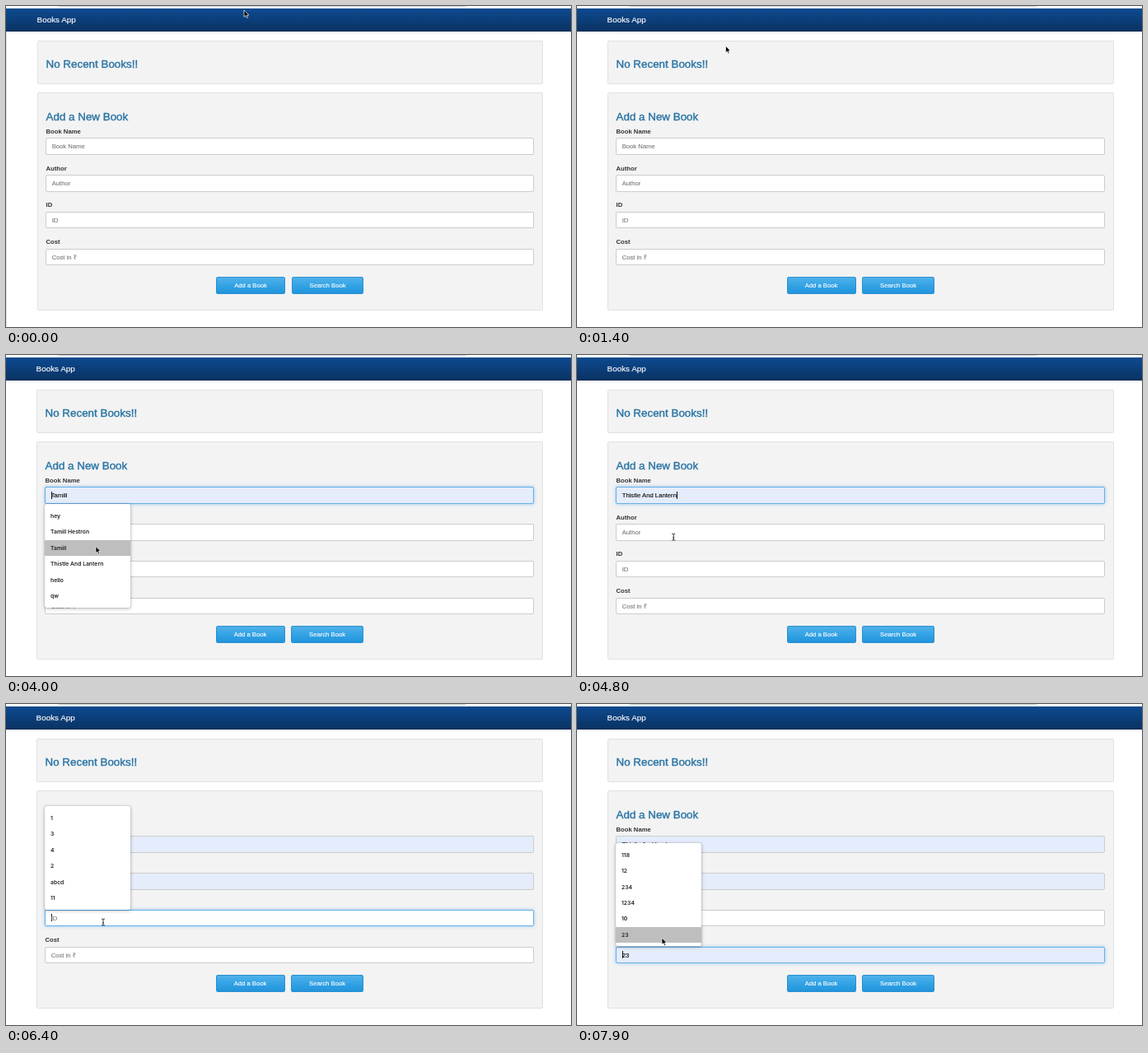
Write an HTML page that moves like this. It is 686 by 390 pixels and loops after 8 s.

```html
<!DOCTYPE html>
<html lang="en">
<head>
<meta charset="utf-8">
<title>Books App</title>
<style>
  html, body { margin: 0; width: 100%; height: 100%; overflow: hidden; background: #fff; }
  body { position: relative; font: 7.7px/10px "Liberation Sans", Arial, sans-serif; color: #333; }
  div, svg { position: absolute; box-sizing: border-box; white-space: pre; }
  #stage { --x: 37px; left: 0; top: 0; width: 686px; height: 390px; overflow: hidden; }
  #stage.early { --x: 38px; }
  #form { left: 0; top: 0; }
  .edge { left: 0; top: 30px; width: 1px; height: 360px; }
  .early .edge { background: #e2e2e2; }
  .tab { left: 64px; top: 0; width: 494px; height: 1px; background: #d0d8de; }
  .nav { left: 0; top: 2.5px; width: 686px; height: 28px; background: linear-gradient(#0d4a90, #0a3364);
         border-bottom: 1px solid #0a2a52; box-shadow: 0 1px 3px rgba(0,0,0,.12);
         padding-left: calc(var(--x) - .4px); font-size: 9.9px; line-height: 28px; color: #fff;
         -webkit-text-stroke: .15px #fff; }
  .panel { left: var(--x); width: calc(651.5px - var(--x)); background: #f3f3f3;
           border: 1px solid #e1e1e1; border-radius: 2px; }
  .head { left: calc(var(--x) + 10.5px); font-size: 13.4px; line-height: 16px; color: #2974a4;
          -webkit-text-stroke: .4px #2974a4; }
  .label { left: calc(var(--x) + 10.5px); font-weight: bold; }
  .field { left: calc(var(--x) + 10.2px); width: calc(630.5px - var(--x)); height: 20.7px;
           padding-left: 6.5px; line-height: 19px; background: #fff; border: 1px solid #ccc;
           border-radius: 2px; color: #777; -webkit-text-stroke: .1px; }
  .field.typed { color: #555; }
  .field.auto { background: #e5ecfb; color: #000; }
  .field.focus { border-color: #66afe9; box-shadow: 0 0 4px rgba(102,175,233,.65); }
  .field i { display: inline-block; width: 1px; height: 9px; margin-right: -1px;
             vertical-align: -1.5px; background: #111; }
  .button { top: 328.5px; height: 21px; line-height: 20px; text-align: center; color: #fff;
            background: linear-gradient(#4fb1ea, #2fa0e3 60%, #2294dc); border: 1px solid #2a90d0;
            border-radius: 2px; -webkit-text-stroke: .15px #fff; }
  #menu { left: 47.3px; width: 103.7px; padding: 5px 0 4px; background: #fff; border-radius: 2px;
          box-shadow: 0 0 1px rgba(0,0,0,.45), 0 1px 4px rgba(0,0,0,.3);
          font: 600 6.8px/19.43px Inter, sans-serif; color: #222; }
  #menu p { margin: 0; height: 19.43px; padding-left: 6.7px; }
  #menu p.on { background: #bebebe; }
  #arrow, #beam { left: 0; top: 0; overflow: visible; }
</style>
</head>
<body>
<div id="stage">
  <div class="edge"></div>
  <div class="tab"></div>
  <div class="nav">Books App</div>
  <div class="panel" style="top:41.5px;height:53px"></div>
  <div class="head" style="top:63.2px">No Recent Books!!</div>
  <div class="panel" style="top:105.3px;height:265px"></div>
  <div class="head" style="top:126.8px">Add a New Book</div>
  <div id="form"></div>
  <div class="button" style="left:calc(var(--x)/2 + 236px);width:84px">Add a Book</div>
  <div class="button" style="left:calc(var(--x)/2 + 327.8px);width:87.5px">Search Book</div>
  <div id="menu"></div>
  <svg id="arrow" width="8" height="12">
    <path d="M0 0V8.2L1.9 6.5L3.2 9.4L4.6 8.8L3.4 6H5.9Z" fill="#000" stroke="#fff" stroke-width=".7"/>
  </svg>
  <svg id="beam" width="6" height="10">
    <path d="M-2-4Q0-4 0-3Q0-4 2-4M0-3V3M-2 4Q0 4 0 3Q0 4 2 4M-1 .9H1" fill="none" stroke="#222" stroke-width=".9"/>
  </svg>
</div>
<script>
const LOOP = 8000, STEP = 100, ROW = 19.43, BLINK = 530;
const $ = id => document.getElementById(id);

// set: when the value stays; caret: when blinking restarts after typing
const fields = [
  { label: 'Book Name', hint: 'Book Name', value: 'Thistle And Lantern', focus: 2700, blur: 5000, set: 4300, auto: true },
  { label: 'Author', hint: 'Author', value: 'Dora Selven', focus: 5000, blur: 6300, set: 5700, auto: true },
  { label: 'ID', hint: 'ID', value: '1', focus: 6300, blur: 7400, set: 6500, caret: 6470 },
  { label: 'Cost', hint: 'Cost in ₹', focus: 7400, blur: LOOP, set: LOOP }
];

const menus = [
  { from: 2700, to: 4300, field: 0, top: 181, items: ['hey', 'Tamill Hestron', 'Tamill', 'Thistle And Lantern', 'hello', 'qw'] },
  { from: 5000, to: 5700, field: 1, top: 226, items: ['Dora Selven', 'adsda', 'Ivor Quenby', 'as', 'qwe', 'q'] },
  { from: 6300, to: 6500, field: 2, top: 124, items: ['1', '3', '4', '2', 'abcd', '11'] },
  { from: 6500, to: 7200, field: 2, top: 270.7, items: ['1', '11', '12'] },
  { from: 7400, to: LOOP, field: 3, top: 168.7, items: ['118', '12', '234', '1234', '10', '23'] }
];

// time, x, y of the pointer
const path = [
  [0, 289, 5], [100, 289, 5], [700, 180.5, 48.5], [1900, 180.5, 48.5], [2100, 257, 78],
  [2300, 257, 78], [2700, 122, 170], [3700, 122, 170], [4000, 109, 232.5], [4200, 113, 254],
  [4500, 113, 254], [4900, 118, 215], [5300, 118, 215], [5500, 122, 232.5], [5700, 122, 232.5],
  [6100, 118, 265], [6600, 118, 265], [7000, 184.7, 302], [7500, 184.7, 302],
  [7800, 103, 284], [LOOP, 103, 284]
];

fields.forEach((f, i) => {
  f.top = 160.4 + i * 44.7;
  const add = (cls, top) => {
    const el = document.createElement('div');
    el.className = cls;
    el.style.top = top + 'px';
    return $('form').appendChild(el);
  };
  add('label', f.top - 12.6).textContent = f.label;
  f.el = add('field', f.top);
});

function pointer(t) {
  const i = path.findIndex(p => p[0] > t);
  const [a, b] = [path[i - 1], path[i]];
  const u = (t - a[0]) / (b[0] - a[0]), e = u * u * (3 - 2 * u);
  return [a[1] + (b[1] - a[1]) * e, a[2] + (b[2] - a[2]) * e];
}

function drawField(f, t, preview) {
  const done = t >= f.set, focus = t >= f.focus && t < f.blur;
  const value = done ? f.value : preview;
  const start = done ? f.caret || f.set : f.focus;
  const caret = focus && (t - start) % (2 * BLINK) < BLINK ? '<i></i>' : '';
  const text = value || f.hint;
  f.el.className = 'field' + (focus ? ' focus' : '') + (done ? ' typed' : '') +
    (preview || done && f.auto ? ' auto' : '');
  f.el.innerHTML = done ? text + caret : caret + text;
}

function draw(t) {
  const [x, y] = pointer(t);
  const menu = menus.find(m => t >= m.from && t < m.to);
  let hover = -1;
  $('stage').className = t < 300 ? 'early' : '';
  $('menu').style.display = menu ? '' : 'none';
  if (menu) {
    const row = Math.floor((y - menu.top - 5) / ROW);
    if (x > 47 && x < 151 && row >= 0 && row < menu.items.length) hover = row;
    $('menu').style.top = menu.top + 'px';
    $('menu').innerHTML = menu.items.map((s, i) => `<p${i === hover ? ' class="on"' : ''}>${s}</p>`).join('');
  }
  fields.forEach((f, i) => drawField(f, t, menu && menu.field === i ? menu.items[hover] : ''));

  const beam = hover < 0 && x > 47 && fields.some(f => y > f.top && y < f.top + 20.7);
  $('arrow').style.display = beam ? 'none' : '';
  $('beam').style.display = beam ? '' : 'none';
  $(beam ? 'beam' : 'arrow').style.transform = `translate(${x}px,${y}px)`;
}

const begin = performance.now();
function tick() {
  const t = (performance.now() - begin) % LOOP;
  draw(Math.floor(t / STEP) * STEP);
  requestAnimationFrame(tick);
}
tick();
</script>
</body>
</html>
```
